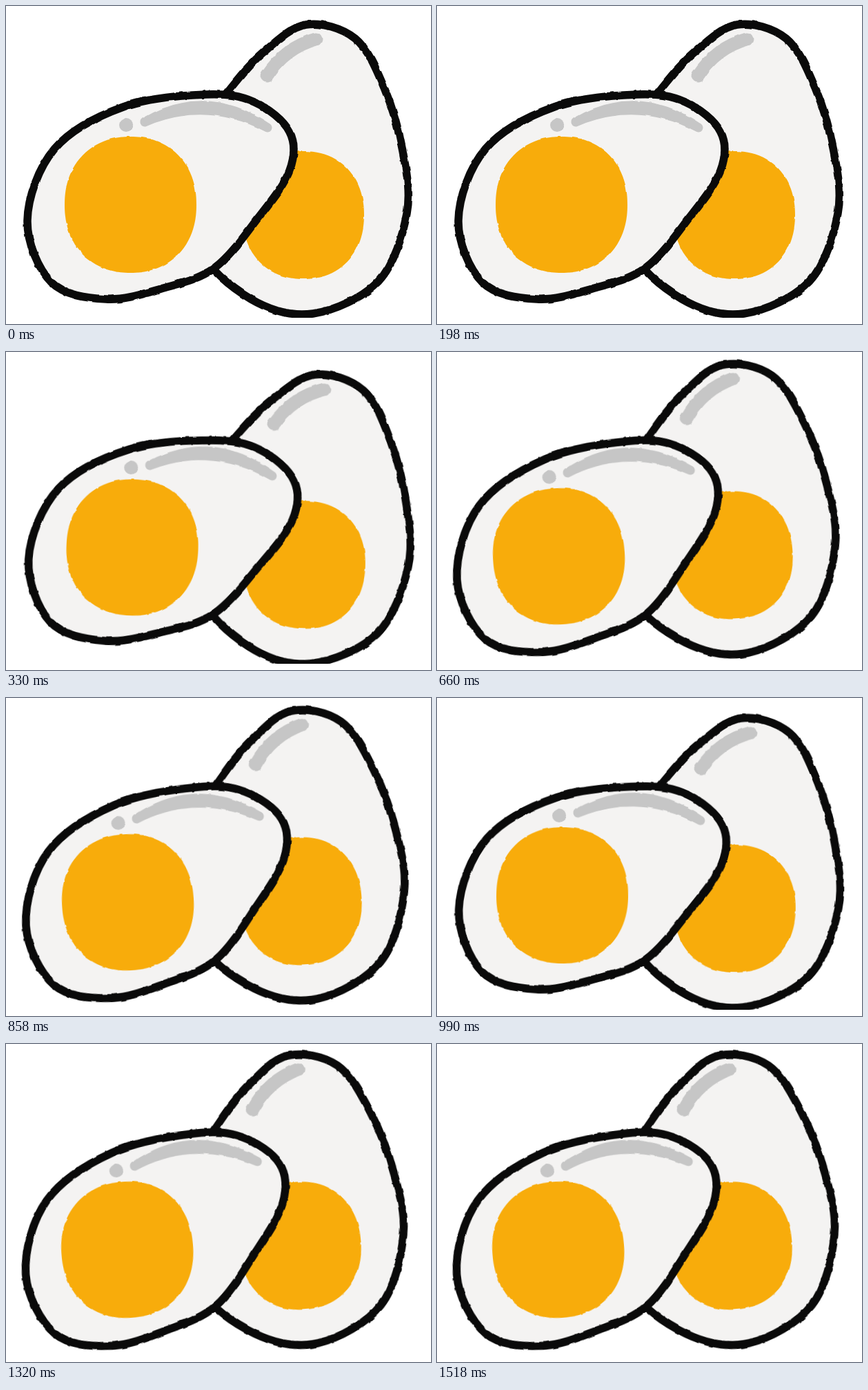
An HTML page for the animation above (1650 ms loop, 616 by 460 pixels).

```html
<!DOCTYPE html>
<html lang="en">
<head>
<meta charset="utf-8">
<title>Two egg halves</title>
<style>
  html, body { margin: 0; width: 100%; height: 100%; overflow: hidden; background: #fff; }
  svg { display: block; clip-path: inset(0 0 9px 0); }
  .egg { fill: #f4f3f2; stroke: #0a0a0a; stroke-width: 11.5; }
  .yolk { fill: #f8ac0b; }
  .shine { fill: none; stroke: #c6c6c6; stroke-linecap: round; stroke-linejoin: round; }
  .crescent { fill: #c6c6c6; }
</style>
</head>
<body>
<svg width="616" height="460" viewBox="0 0 616 460">
  <filter id="rough" filterUnits="userSpaceOnUse" x="-40" y="-40" width="700" height="560" color-interpolation-filters="sRGB">
    <feTurbulence type="fractalNoise" baseFrequency="0.07" numOctaves="2" seed="4"/>
    <feDisplacementMap in="SourceGraphic" scale="3" xChannelSelector="R" yChannelSelector="G"/>
  </filter>
  <g id="eggs">
    <g filter="url(#rough)">
      <path class="egg" id="backEgg"/>
      <path class="yolk" id="backYolk"/>
      <path class="shine" stroke-width="19" d="M378 101Q405 60 449 48"/>
      <path class="egg" id="frontEgg"/>
      <path class="yolk" id="frontYolk"/>
      <path class="shine crescent" stroke-width="13" d="M201 168Q290 116 379 176Q290 130 201 168Z"/>
      <path class="shine" stroke-width="20" d="M174 172h.1"/>
    </g>
  </g>
</svg>
<script>
const $ = id => document.getElementById(id);

// Closed Catmull-Rom curve through [x, y] points
function smooth(pts) {
  const at = i => pts[(i + pts.length) % pts.length];
  const handle = (i, dir) => at(i).map((v, k) => v + dir * (at(i + 1)[k] - at(i - 1)[k]) / 6);
  const curves = pts.map((_, i) => `C${handle(i, 1)} ${handle(i + 1, -1)} ${at(i + 1)}`);
  return `M${pts[0]}${curves.join('')}Z`;
}

// Slightly squared ellipse
function yolk(cx, cy, rx, ry) {
  const bend = v => Math.sign(v) * Math.abs(v) ** 0.92;
  return smooth(Array.from({ length: 24 }, (_, i) => {
    const a = (i + 0.5) * Math.PI / 12;
    return [cx + rx * bend(Math.cos(a)), cy + ry * bend(Math.sin(a))];
  }));
}

const shapes = {
  backEgg: smooth([[318, 128], [372, 68], [435, 27], [506, 47], [548, 118], [575, 210],
    [581, 300], [540, 398], [445, 445], [355, 424], [275, 346], [250, 220]]),
  frontEgg: smooth([[290, 128], [360, 139], [411, 182], [411, 238], [365, 307], [302, 379],
    [225, 409], [145, 424], [66, 400], [31, 310], [70, 207], [170, 146]]),
  backYolk: yolk(431, 302.5, 88, 92.5),
  frontYolk: yolk(180.5, 287.5, 95.5, 98.5),
};
for (const id in shapes) $(id).setAttribute('d', shapes[id]);

// The whole picture rocks in hard steps
const STEP = 330, TILTS = [0, 2.3, -3.8, 0.95, -4.75];

function draw() {
  const tilt = TILTS[Math.floor(performance.now() / STEP) % TILTS.length];
  $('eggs').setAttribute('transform', `rotate(${tilt} 300 350)`);
  requestAnimationFrame(draw);
}
draw();
</script>
</body>
</html>
```
